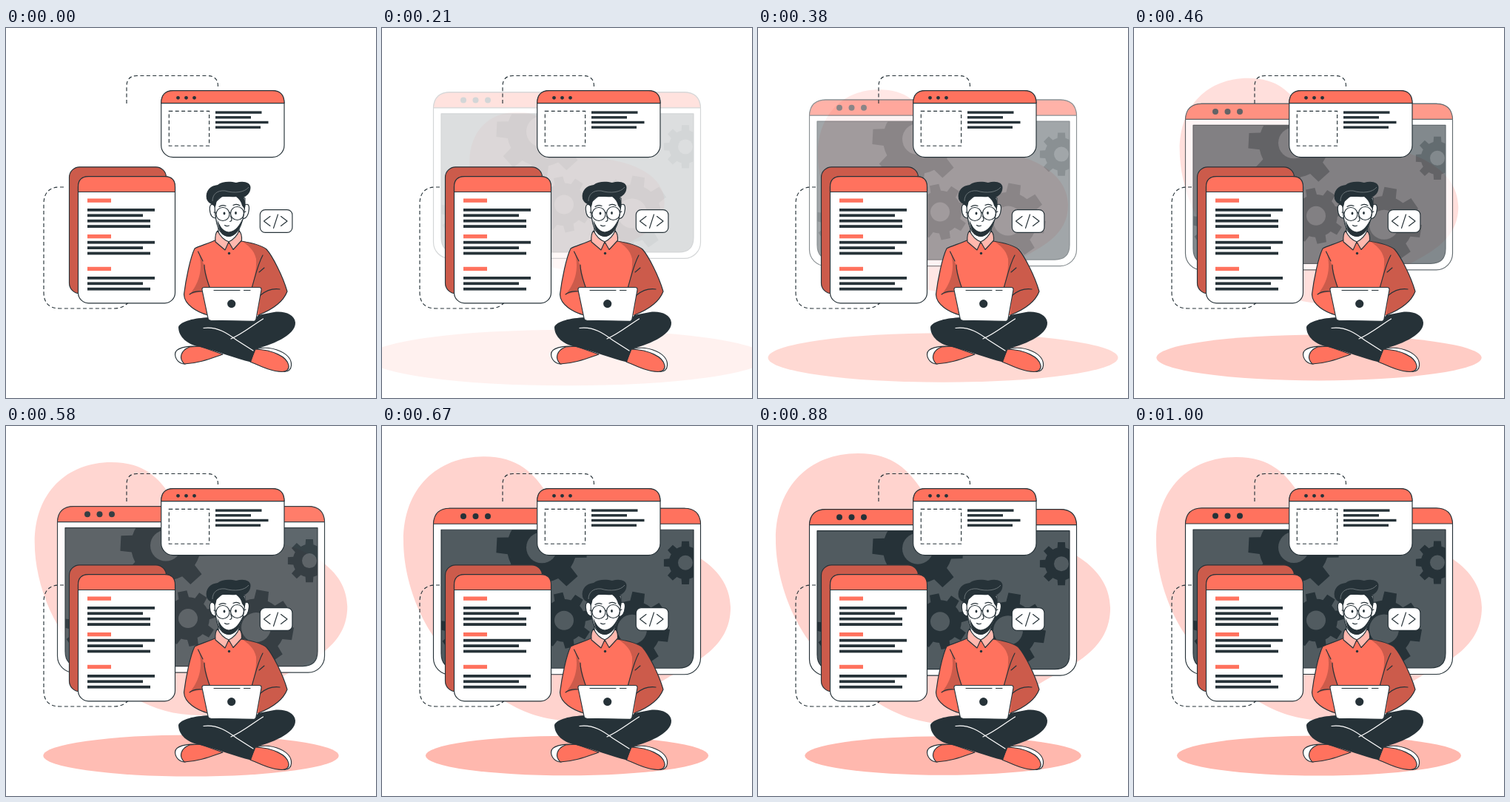
These frames come from a looping animation (500 px wide and 500 px high, 1040 ms). An HTML page:

```html
<!DOCTYPE html>
<html lang="en">
<head>
<meta charset="utf-8">
<title>Developer at work</title>
<style>
  html, body { margin: 0; width: 100%; height: 100%; overflow: hidden; background: #fff; }
  svg { display: block; width: 100%; height: 100%; --p: 0; }
  .blob, .floor, .screen { opacity: var(--p); }
  .blob { fill: #ffd3ce; transform-origin: 250px 220px; transform: scale(calc(.5 + .5 * var(--p))); }
  .floor { fill: #ffb8ae; transform-origin: 250px 445.5px; transform: scale(calc(1.5 - .5 * var(--p))); }
  .screen { transform: translateY(calc(30px * (var(--p) - 1))); }
  .ink { fill: #263238; }
  .coral { fill: #ff725e; }
  .rust { fill: #cc5b4b; }
  .pink { fill: #ffb8ae; }
  .white { fill: #fff; }
  .none { fill: none; }
  .line { stroke: #263238; stroke-width: 1.15; stroke-linecap: round; stroke-linejoin: round; }
  .dash { fill: none; stroke: #263238; stroke-width: 1.15; stroke-dasharray: 5 3.4; }
  .glint { fill: none; stroke: #fff; stroke-width: 1.2; stroke-linecap: round; }
</style>
</head>
<body>
<svg id="stage" viewBox="0 0 500 500">
  <clipPath id="glass"><path d="M80 140H421V307Q421 327 401 327H100Q80 327 80 307Z"/></clipPath>

  <path class="blob" d="M30 155C30 85 75 42 138 42C185 42 205 65 222 90C250 135 290 143 335 148C400 156 469 185 470 245C470 300 420 320 385 340C345 362 325 398 270 398C190 400 150 362 110 325C60 290 30 215 30 155Z"/>
  <ellipse class="floor" cx="250" cy="445.5" rx="192" ry="27"/>

  <g class="screen">
    <rect class="white line" x="69.5" y="111" width="361" height="224.5" rx="22"/>
    <path class="coral line" d="M69.5 132V131Q71 111 91.500 111H408.500Q429 111 430.500 131V132Z"/>
    <g class="ink">
      <circle cx="110" cy="121.6" r="4"/><circle cx="126.500" cy="121.6" r="4"/><circle cx="143" cy="121.6" r="4"/>
    </g>
    <g clip-path="url(#glass)">
      <rect x="80" y="140" width="341" height="187" fill="#515b60"/>
      <g id="gears"></g>
    </g>
    <path class="none line" d="M80 140H421V307Q421 327 401 327H100Q80 327 80 307Z"/>
  </g>

  <path class="dash" d="M163 102V79Q163 64.500 177 64.500H272Q286.500 64.500 286.500 79"/>
  <path class="dash" d="M78 215H73Q51 215 51 238V357Q51 379 73 379H146Q158 379 165 371"/>

  <!-- browser card -->
  <rect class="white line" x="209.700" y="84.600" width="166.300" height="90" rx="16"/>
  <path class="coral line" d="M209.700 101.600Q209.700 84.600 226 84.600H360Q376 84.600 376 101.600Z"/>
  <g class="ink">
    <circle cx="232.500" cy="94.300" r="2.400"/><circle cx="243.500" cy="94.300" r="2.400"/><circle cx="254.500" cy="94.300" r="2.400"/>
  </g>
  <rect class="dash" x="220.300" y="112.400" width="54.300" height="46.800"/>

  <!-- document cards -->
  <rect class="rust line" x="85.500" y="187.800" width="131" height="171" rx="14"/>
  <rect class="white line" x="97.500" y="200.600" width="131" height="171.200" rx="14"/>
  <path class="coral line" d="M97.500 221.500V214.600Q97.500 200.600 111.500 200.600H214.500Q228.500 200.600 228.500 214.600V221.500Z"/>
  <g id="bars"></g>

  <!-- code tag -->
  <rect class="white line" x="343.300" y="245.600" width="43.600" height="30.800" rx="7"/>
  <path class="none line" d="M357 254.500L348.500 261L357 267.500M367.500 252L361.500 270.500M371.500 254.500L380 261L371.500 267.500"/>

  <!-- shoes -->
  <path class="white line" d="M262 431C244 428 228 433 228.500 441C229 448 234 454 242 454L262 446Z"/>
  <path class="coral line" d="M248 431C236 436 233 446 241 454C262 453 278 446 293 441L262 430Z"/>
  <path class="white line" d="M337 434C360 428 387 440 385.500 456Q385 464 376 464.500L345 440Z"/>
  <path class="coral line" d="M337 434C360 435 380 444 382 456Q383 464 373 464.500C357 464 342 456 330 451Z"/>

  <!-- legs -->
  <path class="ink" d="M274 391C255 392 236 396 233 404C233 418 246 428 262 431C285 436 310 447 331 451.500L337 434C356 429 392 416 391 398C390 387 376 382 362 384L341 388L336 394Z"/>
  <path class="glint" d="M267 405.500C286 403 300 413 312 422L334 436M347.500 393C330 404 320 413 304 420"/>

  <!-- sweater -->
  <path class="coral" d="M284 286C275 291 262 294 255 298C249 310 243 340 240.500 360C241 374 258 384 273 388H341C356 382 374 372 380 356C374 335 360 308 352 299C346 294 330 290 318 288Z"/>
  <path class="rust" d="M319 288C330 290 346 294 352 299C360 308 374 335 380 356C374 372 356 382 341 388L345 351H332C335 340 339 326 338 312C335 299 327 294 319 288ZM260 303L268 321L275 350H266L264 356L248 360C259 348 268 326 260 303Z"/>
  <path class="none line" d="M284 286C275 291 262 294 255 298C249 310 243 340 240.500 360C241 374 258 384 273 388M341 388C356 382 374 372 380 356C374 335 360 308 352 299C346 294 330 290 318 288"/>
  <path class="none line" d="M259.500 302L266 315M268 320C268 332 272 341 275 350M248 360Q254 355 265 356M347 307C340 320 337 335 332.500 350M349 324L342 330M370 353Q356 351 344 361"/>

  <!-- neck and collar -->
  <path class="white line" d="M287 262V280L301 291L315 279V262Z"/>
  <path class="pink line" d="M286 274Q282 278 283 289L296 300L301 289Q291 285 286 274ZM315 274Q319 278 318.500 287L307 299.500L301 289Q311 284 315 274Z"/>
  <circle class="ink" cx="301.500" cy="304.500" r="1.700"/>

  <!-- head -->
  <path class="white line" d="M283 240Q275 235 275.300 245Q276 257 284 257ZM321 240Q328.500 235 328.500 244Q327.500 257 320 258Z"/>
  <path class="white line" d="M282 236C282 258 286 281 301 281.500C316 280 323 258 323 230L300 220Z"/>
  <path class="ink" d="M285.500 259C287 272 292 282 301 282C310 281.500 317 270 319.500 258C315 267 311 274 301 275.500C292 274 289 267 285.500 259Z"/>
  <path class="ink" d="M282 243C281 237 274 239 271 231C269 220 276 213 286 212C292 207 303 207 311 209C320 206 331 208 330.500 216C330 224 325 227 321 229C324 235 324 240 322.500 245L319 240C318 235 315 231 311 228C301 229 291 226 287 231C283 235 285 239 282 243Z"/>
  <path fill="none" stroke="#7b8488" stroke-width=".8" d="M279 234C279 225 285 219 296 220C309 224 323 222 328 215"/>
  <path class="none line" stroke-width="1.600" d="M288 241.500Q292 238.500 297 240.500M307 239.500Q312 237 316 240"/>
  <circle class="none line" cx="293" cy="251.500" r="9"/>
  <circle class="none line" cx="312.500" cy="250.500" r="9"/>
  <path class="none line" d="M302 250Q302.800 248.500 303.600 250M284 250L281 249M321.500 249L324 248M303.500 254Q307 261 302.500 261.500M295.500 266.500Q298 268.500 301.500 267"/>
  <ellipse class="ink" cx="295" cy="250.500" rx="1.400" ry="2"/>
  <ellipse class="ink" cx="310.500" cy="250" rx="1.400" ry="2"/>

  <!-- laptop -->
  <path class="white line" d="M268 350.500H342Q345.500 350.500 345 354L338 393Q337.500 396.300 334 396.300L277 395.300Q273.500 395 273 392L265 354Q264.500 350.500 268 350.500Z"/>
  <path class="none line" d="M281 354.500H316M321.500 354.500H330"/>
  <circle class="ink" cx="304.700" cy="372.600" r="5.600"/>
</svg>
<script>
  const stage = document.getElementById('stage');

  function add(parent, tag, attrs) {
    const el = document.createElementNS('http://www.w3.org/2000/svg', tag);
    for (const key in attrs) el.setAttribute(key, attrs[key]);
    document.getElementById(parent).appendChild(el);
  }

  // Eight-toothed gear; turn is the angle of one tooth in degrees.
  function gear(cx, cy, outer, hole, turn) {
    const root = outer * 0.76, points = [];
    for (let i = 0; i < 8; i++) {
      for (const [r, offset] of [[root, -14], [outer, -9.5], [outer, 9.5], [root, 14], [root, 22.5]]) {
        const a = (turn + i * 45 + offset) * Math.PI / 180;
        points.push((cx + r * Math.cos(a)).toFixed(2) + ',' + (cy + r * Math.sin(a)).toFixed(2));
      }
    }
    add('gears', 'polygon', { points: points.join(' '), class: 'ink' });
    add('gears', 'circle', { cx, cy, r: hole, fill: '#515b60' });
  }

  gear(216, 164, 62, 21, 3);
  gear(246, 262.5, 38, 13, 33);
  gear(338, 274.5, 51, 20, 10);
  gear(410, 184.5, 29.5, 10, 0);
  gear(114, 275, 36, 13, 10);

  function bar(x, y, width, height, kind = 'ink') {
    add('bars', 'rect', { x, y, width, height, class: kind });
  }

  [62.5, 48, 71.5, 61].forEach((w, i) => bar(283, 112.4 + i * 6.7, w, 3.4));
  [[230.5, 244, 4], [279, 287.8, 3], [322.8, 336, 3]].forEach(([head, top, rows]) => {
    bar(110, head, 32, 5.3, 'coral');
    [91, 75, 85, 85].slice(0, rows).forEach((w, i) => bar(110, top + i * 7.4, w, 3.8));
  });

  const LOOP = 1040, FPS = 24;

  // cubic-bezier(.36, -.01, .5, 1.38)
  function ease(x) {
    if (x >= 1) return 1;
    const curve = (s, a, b) => 3 * (1 - s) * s * ((1 - s) * a + s * b) + s * s * s;
    let lo = 0, hi = 1;
    for (let i = 0; i < 30; i++) {
      const mid = (lo + hi) / 2;
      if (curve(mid, 0.36, 0.5) < x) lo = mid; else hi = mid;
    }
    return curve(lo, -0.01, 1.38);
  }

  // Motion advances in 24 steps per second, after a short empty hold.
  function draw() {
    const t = performance.now() % LOOP;
    const step = Math.floor((t + 7) * FPS / 1000);
    stage.style.setProperty('--p', step < 2 ? 0 : ease((step + 0.6) / FPS).toFixed(4));
    requestAnimationFrame(draw);
  }
  draw();
</script>
</body>
</html>
```
